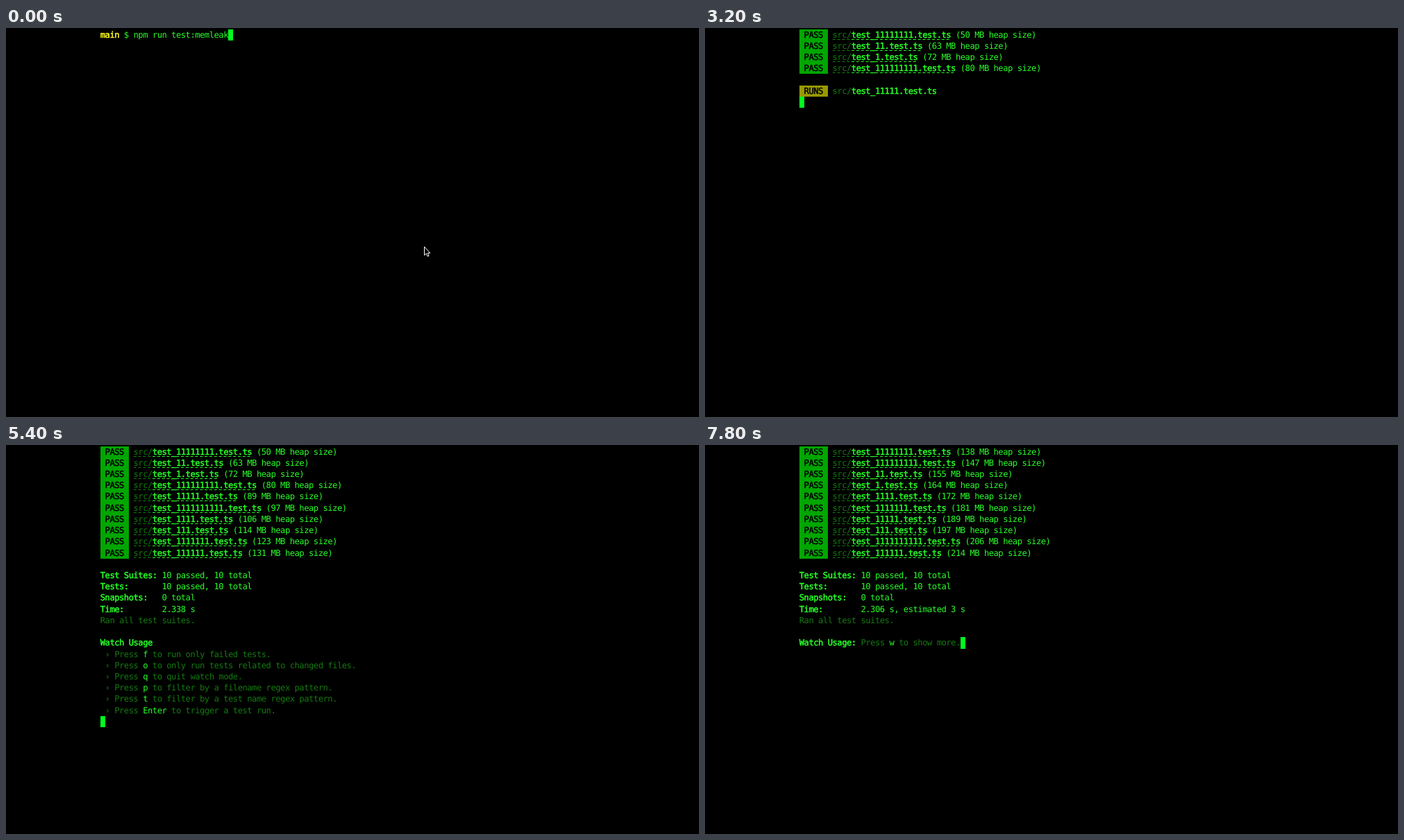
An HTML page with a canvas that plays this animation: 998 by 561 pixels, repeating every 8 s.

```html
<!DOCTYPE html>
<html lang="en">
<head>
<meta charset="utf-8">
<title>Terminal test run</title>
<style>
  html, body { margin: 0; width: 100%; height: 100%; overflow: hidden; background: #000; }
  canvas { display: block; }
</style>
</head>
<body>
<canvas id="screen" width="998" height="561"></canvas>
<script>
const ctx = document.getElementById('screen').getContext('2d');
const LOOP = 8000, STEP = 200;
const LEFT = 136, TOP = 1.6, CELL = 6.824, LINE = 16.22, BASELINE = 12;
const FONT = '12.2px "DejaVu Sans Mono", monospace';

const STYLES = {
  text: { color: '#28fe28' },
  bold: { color: '#28fe28', bold: true },
  dim: { color: '#147a10' },
  prompt: { color: '#ffff1e', bold: true },
  pass: { color: '#000', bold: true, back: '#00a600' },
  runs: { color: '#000', bold: true, back: '#999900' },
  dimLink: { color: '#147a10', link: true },
  boldLink: { color: '#28fe28', bold: true, link: true },
};

// ones: how many 1s the file name holds; heap: MB after each test
const RUNS = [
  { start: 2000, firstPass: 2600, time: '2.338 s',
    ones: [8, 2, 1, 9, 5, 10, 4, 3, 7, 6],
    heap: [50, 63, 72, 80, 89, 97, 106, 114, 123, 131] },
  { start: 5600, firstPass: 6000, time: '2.306 s, estimated 3 s',
    ones: [8, 9, 2, 1, 4, 7, 5, 3, 10, 6],
    heap: [138, 147, 155, 164, 172, 181, 189, 197, 206, 214] },
];

const KEYS = [
  ['f', 'run only failed tests.'],
  ['o', 'only run tests related to changed files.'],
  ['q', 'quit watch mode.'],
  ['p', 'filter by a filename regex pattern.'],
  ['t', 'filter by a test name regex pattern.'],
  ['Enter', 'trigger a test run.'],
];

const colX = col => LEFT + col * CELL;
const rowY = row => Math.round(TOP + row * LINE);

function fillCells(row, col, count, color) {
  const x = Math.round(colX(col)), y = rowY(row);
  ctx.fillStyle = color;
  ctx.fillRect(x, y, Math.round(colX(col + count)) - x, rowY(row + 1) - y);
}

// Centres a glyph in its cell; bold is the regular shape with a thin outline.
function drawGlyph(ch, row, col, bold) {
  const x = colX(col + 0.5), y = TOP + row * LINE + BASELINE;
  ctx.fillText(ch, x, y);
  if (bold) ctx.strokeText(ch, x, y);
}

function underline(row, col, count) {
  const y = rowY(row) + 14.5;
  ctx.lineWidth = 1;
  ctx.setLineDash([4, CELL - 4]);
  ctx.beginPath();
  ctx.moveTo(colX(col), y);
  ctx.lineTo(colX(col + count), y);
  ctx.stroke();
  ctx.setLineDash([]);
}

// Writes [text, style] pairs from the left edge and returns the end column.
function writeLine(row, ...parts) {
  let col = 0;
  for (const [text, name] of parts) {
    const style = STYLES[name];
    if (style.back) fillCells(row, col, text.length, style.back);
    ctx.fillStyle = ctx.strokeStyle = style.color;
    ctx.lineWidth = 0.5;
    [...text].forEach((ch, i) => drawGlyph(ch, row, col + i, style.bold));
    if (style.link) underline(row, col, text.length);
    col += text.length;
  }
  return col;
}

function drawCursor(row, col = 0) {
  fillCells(row, col, 1, '#00ff1e');
}

function drawPointer() {
  ctx.strokeStyle = '#fff';
  ctx.lineWidth = 1;
  ctx.stroke(new Path2D(
    'M602.5 315.5V327.8L605.3 325.2L607 329.3L609 328.5L607.3 324.6H610.8Z'));
}

function drawStartup(t) {
  const end = writeLine(0, ['main', 'prompt'], [' $ npm run test:memleak', 'text']);
  if (t < 1000) {
    drawPointer();
    return drawCursor(0, end);
  }
  if (t >= 1200) {
    writeLine(2, ['> repro@1.0.0 test:memleak', 'text']);
    writeLine(3, ['> npm run test:mem -- --watchAll --runInBand', 'text']);
  }
  if (t >= 1600) {
    writeLine(6, ['> repro@1.0.0 test:mem', 'text']);
    writeLine(7, ['> node --expose-gc ./node_modules/.bin/jest --logHeapUsage "--watchAll" "--runInBand"', 'text']);
  }
  drawCursor(t < 1200 ? 1 : t < 1600 ? 5 : 9);
}

function drawSummary(run) {
  const rows = [
    ['Test Suites:', '10 passed, 10 total'],
    ['Tests:', '10 passed, 10 total'],
    ['Snapshots:', '0 total'],
    ['Time:', run.time],
  ];
  rows.forEach(([label, value], i) =>
    writeLine(11 + i, [label.padEnd(13), 'bold'], [value, 'text']));
  writeLine(15, ['Ran all test suites.', 'dim']);

  if (run === RUNS[0]) {
    writeLine(17, ['Watch Usage', 'bold']);
    KEYS.forEach(([key, action], i) =>
      writeLine(18 + i, [' › Press ', 'dim'], [key, 'text'], [' to ' + action, 'dim']));
    drawCursor(24);
  } else {
    drawCursor(17, writeLine(17, ['Watch Usage:', 'bold'],
      [' Press ', 'dim'], ['w', 'text'], [' to show more.', 'dim']));
  }
}

function drawRun(run, t) {
  const total = run.ones.length;
  const passed = Math.max(0, Math.min(total, Math.floor((t - run.firstPass) / STEP) + 1));
  const fileName = i => `test_${'1'.repeat(run.ones[i])}.test.ts`;

  for (let i = 0; i < passed; i++) {
    writeLine(i, [' PASS ', 'pass'], [' ', 'text'], ['src/', 'dimLink'],
      [fileName(i), 'boldLink'], [` (${run.heap[i]} MB heap size)`, 'text']);
  }
  if (passed === total) return drawSummary(run);
  writeLine(passed + 1, [' RUNS ', 'runs'], [' ', 'text'], ['src/', 'dim'],
    [fileName(passed), 'bold']);
  drawCursor(passed + 2);
}

function draw(now) {
  const t = now % LOOP;
  ctx.font = FONT;
  ctx.textAlign = 'center';
  ctx.textRendering = 'geometricPrecision';
  ctx.lineJoin = 'round';
  ctx.fillStyle = '#000';
  ctx.fillRect(0, 0, 998, 561);
  if (t < RUNS[0].start) drawStartup(t);
  else drawRun(RUNS[t < RUNS[1].start ? 0 : 1], t);
  requestAnimationFrame(draw);
}
requestAnimationFrame(draw);
</script>
</body>
</html>
```
